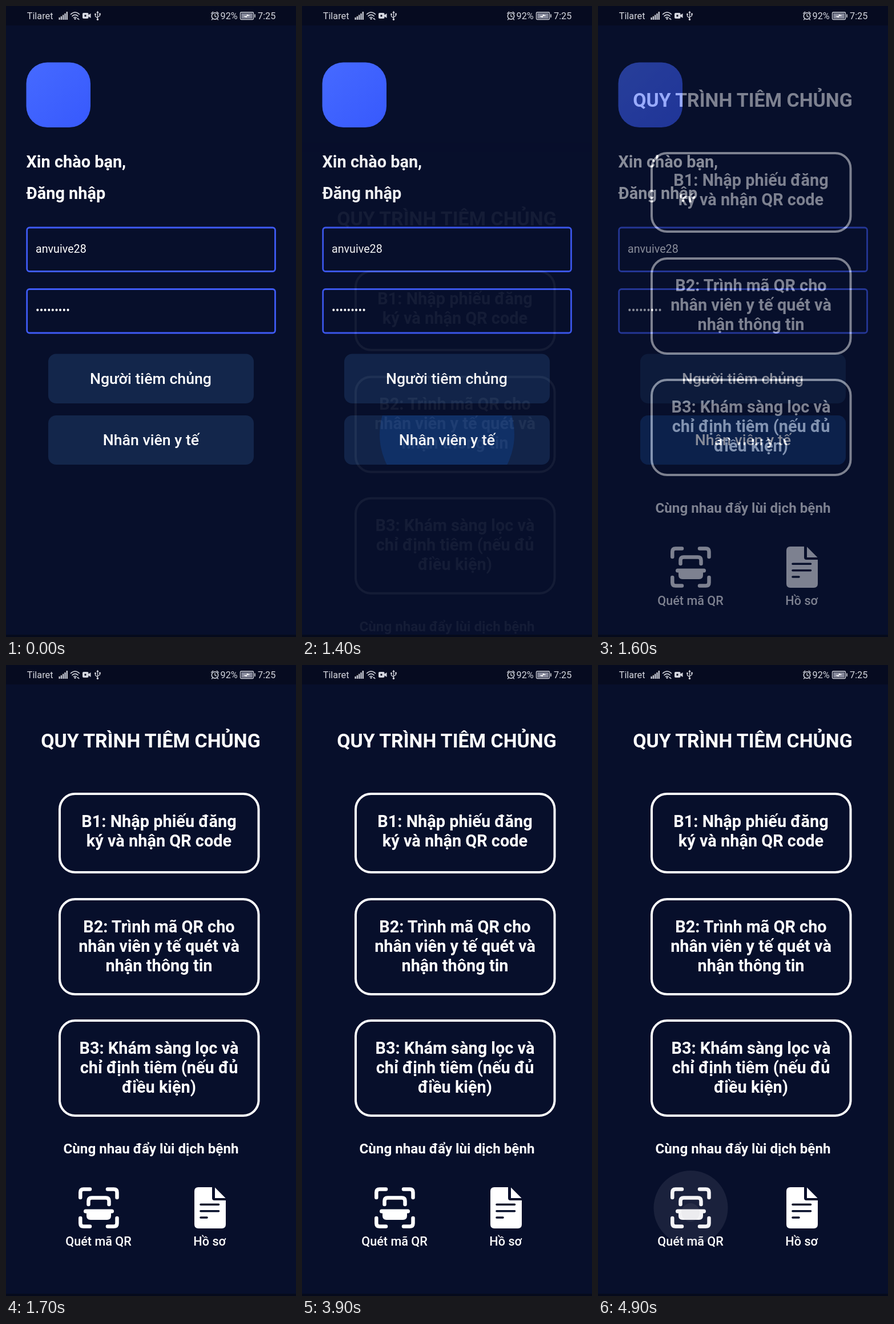
An HTML page for the animation above (5000 ms loop, 508 px wide and 1102 px high).

```html
<!DOCTYPE html>
<html lang="vi">
<head>
<meta charset="utf-8">
<title>Tiêm chủng</title>
<style>
  html, body { margin: 0; width: 100%; height: 100%; overflow: hidden; background: #070f2b; }
  svg { display: block; width: 100%; height: 100%; font-family: Roboto, sans-serif; fill: #fff; }
  .bold { font-weight: 700; }
  .medium { font-weight: 500; }
  .middle { text-anchor: middle; }
  .heading { font-size: 28.9px; }
  .field { fill: none; stroke: #3f5bf6; stroke-width: 2.8; }
  .input { font-size: 19.7px; }
  .button { fill: #13264b; }
  .action { font-size: 26.7px; }
  .step { fill: none; stroke: #fff; stroke-width: 4; }
  .label { font-size: 21.6px; }
  .status { font-size: 16.3px; fill: #d5d7df; }
  .line { fill: none; stroke-linecap: round; stroke-linejoin: round; }
</style>
</head>
<body>
<svg viewBox="0 0 508 1102" xmlns="http://www.w3.org/2000/svg">
  <defs>
    <linearGradient id="tile" x2="1" y2="1">
      <stop stop-color="#466aff"/><stop offset="1" stop-color="#3759fd"/>
    </linearGradient>
    <clipPath id="staffClip"><rect x="74" y="715" width="360" height="86" rx="14"/></clipPath>
  </defs>

  <g id="login">
    <rect width="508" height="1102" fill="#070f2b"/>
    <rect x="35.5" y="98.5" width="112.5" height="113.5" rx="37" fill="url(#tile)"/>
    <g class="bold heading">
      <text x="35.5" y="281.5">Xin chào bạn,</text>
      <text x="35.5" y="336.5">Đăng nhập</text>
    </g>
    <rect class="field" x="36.7" y="387" width="434.8" height="76.5" rx="4.5"/>
    <rect class="field" x="36.7" y="494.5" width="434.8" height="76.5" rx="4.5"/>
    <text class="input" x="52" y="431">anvuive28</text>
    <text class="input" x="52" y="538.3">•••••••••</text>
    <rect class="button" x="74" y="607.5" width="360" height="86.5" rx="14"/>
    <rect class="button" x="74" y="715" width="360" height="86" rx="14"/>
    <g clip-path="url(#staffClip)"><circle id="staffRipple" cx="254" cy="748" fill="#11326a"/></g>
    <g class="medium middle action">
      <text x="253.5" y="659.5">Người tiêm chủng</text>
      <text x="254" y="767">Nhân viên y tế</text>
    </g>
  </g>

  <g id="guide">
    <rect width="508" height="1102" fill="#070f2b"/>
    <text class="bold middle" x="253.5" y="144.3" font-size="33.8">QUY TRÌNH TIÊM CHỦNG</text>
    <g id="steps" class="bold middle heading"></g>
    <text class="bold middle" x="254" y="853" font-size="24.2">Cùng nhau đẩy lùi dịch bệnh</text>

    <g class="line" stroke="#fff" stroke-width="6.5">
      <path d="M130.3 930V921q0-5.500 5.500-5.500H147M178 915.500h11q5.500 0 5.500 5.500v9M194.500 966v9q0 5.500-5.500 5.500h-11M147 980.500h-11.200q-5.500 0-5.500-5.500v-9"/>
      <path d="M144.500 942v-6q0-5.500 5.500-5.500h25q5.500 0 5.500 5.500v6"/>
    </g>
    <rect x="136" y="950.500" width="53" height="7" rx="3.500"/>
    <path d="M141 956h43v6q0 7-7 7h-29q-7 0-7-7z"/>

    <path d="M337 912h24v19q0 4 4 4h20v42q0 7-7 7h-41q-7 0-7-7v-58q0-7 7-7zM366 912.500l18.500 18.500H366z"/>
    <path class="line" d="M341 942.300h31.500M341 953.700h31.500M341 965h11" stroke="#070f2b" stroke-width="3.600"/>

    <g class="medium middle label">
      <text x="162" y="1014.300">Quét mã QR</text>
      <text x="356.700" y="1014.300">Hồ sơ</text>
    </g>
    <g id="scanRipple" fill="#a4a6b2">
      <circle cx="162.500" cy="948" r="65" opacity=".12"/>
      <circle id="scanTouch" cx="162" cy="956" opacity=".1"/>
    </g>
  </g>

  <rect width="508" height="34" fill="#060b20"/>
  <rect y="1098" width="508" height="4" fill="#050a1c"/>
  <g class="status">
    <text x="36.700" y="23">Tilaret</text>
    <text x="375.500" y="23">92%</text>
    <text x="441" y="23">7:25</text>
    <g id="signal"></g>
    <g class="line" stroke="#d5d7df" stroke-width="1.600">
      <path d="M113.500 14.500q7.500-7 15 0M116 17.700q5-4.500 10 0M118.500 20.500q2.500-2 5 0"/>
      <path d="M160.500 11v13M156.500 14.500v3.500l4 3M164.500 14v3l-4 2.500" stroke-width="1.300"/>
      <circle cx="366" cy="17.500" r="5.700"/>
      <path d="M366 14.200v3.600l2.500 1.300M359.700 13l3-2.700M372.300 13l-3-2.700M362 22.500l-1.500 1.500M370 22.500l1.500 1.500" stroke-width="1.300"/>
      <rect x="410.500" y="11" width="23" height="12.500" rx="1.500" stroke-width="1.300"/>
      <path d="M436 15v4.500"/>
    </g>
    <path d="M160.500 8.500l2.200 3.500h-4.400z"/>
    <circle cx="160.500" cy="23.500" r="1.700"/>
    <circle cx="156.500" cy="14.500" r="1.400"/>
    <rect x="163.200" y="12.700" width="2.600" height="2.600"/>
    <circle cx="121" cy="22.500" r="1.400"/>
    <path d="M126 20.500l2 2.500h-4zM127.500 24.500l-1.500-1.500h3z"/>
    <rect x="134" y="12" width="10.500" height="10" rx="2"/>
    <path d="M144 16l4.500-3v8l-4.500-3z"/>
    <circle cx="139" cy="17" r="1.700" fill="#060b20"/>
    <rect x="412.200" y="12.700" width="19.600" height="9.200" fill="#85889a"/>
    <path d="M415.500 17.800l6-.3.500-2.700 6 2.300-6 .6-.5 2.600z" fill="#fff"/>
  </g>
</svg>

<script>
const byId = id => document.getElementById(id);
const clamp = v => Math.min(1, Math.max(0, v));

const steps = [
  { y: 225, height: 137, lines: ['B1: Nhập phiếu đăng', 'ký và nhận QR code'] },
  { y: 409, height: 166, lines: ['B2: Trình mã QR cho', 'nhân viên y tế quét và', 'nhận thông tin'] },
  { y: 621, height: 166, lines: ['B3: Khám sàng lọc và', 'chỉ định tiêm (nếu đủ', 'điều kiện)'] },
];
byId('steps').innerHTML = steps.map(({ y, height, lines }) =>
  `<rect class="step" x="94" y="${y}" width="348.5" height="${height}" rx="27"/>` +
  lines.map((line, i) => `<text x="268" y="${y + 57.5 + 34 * i}">${line}</text>`).join('')
).join('');

byId('signal').innerHTML = [4, 6, 8.5, 11, 14].map((h, i) =>
  `<rect x="${92.5 + 3.3 * i}" y="${24 - h}" width="2.2" height="${h}"/>`).join('');

// The fade starts slowly, then catches up with the slide.
function pageOpacity(p) {
  if (p < 0.5) return p / 2;
  return p < 0.9 ? 0.25 + (p - 0.5) * 1.125 : 0.7 + (p - 0.9) * 3;
}

function render(t) {
  const p = clamp((t - 1367) / 333);
  const guide = byId('guide');
  guide.setAttribute('visibility', p > 0 ? 'visible' : 'hidden');
  guide.setAttribute('opacity', pageOpacity(p));
  guide.setAttribute('transform', `translate(0 ${289 * (1 - p) ** 1.83})`);

  byId('staffRipple').setAttribute('r', t < 1300 ? 0 : 60 + 0.58 * (t - 1300));

  const press = clamp((t - 4600) / 300);
  byId('scanRipple').setAttribute('opacity', press);
  byId('scanTouch').setAttribute('r', 16 * press);
}

const start = performance.now();
function frame() {
  const t = Math.max(0, performance.now() - start) % 5000;
  render(Math.floor(t / 100) * 100);
  requestAnimationFrame(frame);
}
frame();
</script>
</body>
</html>
```
